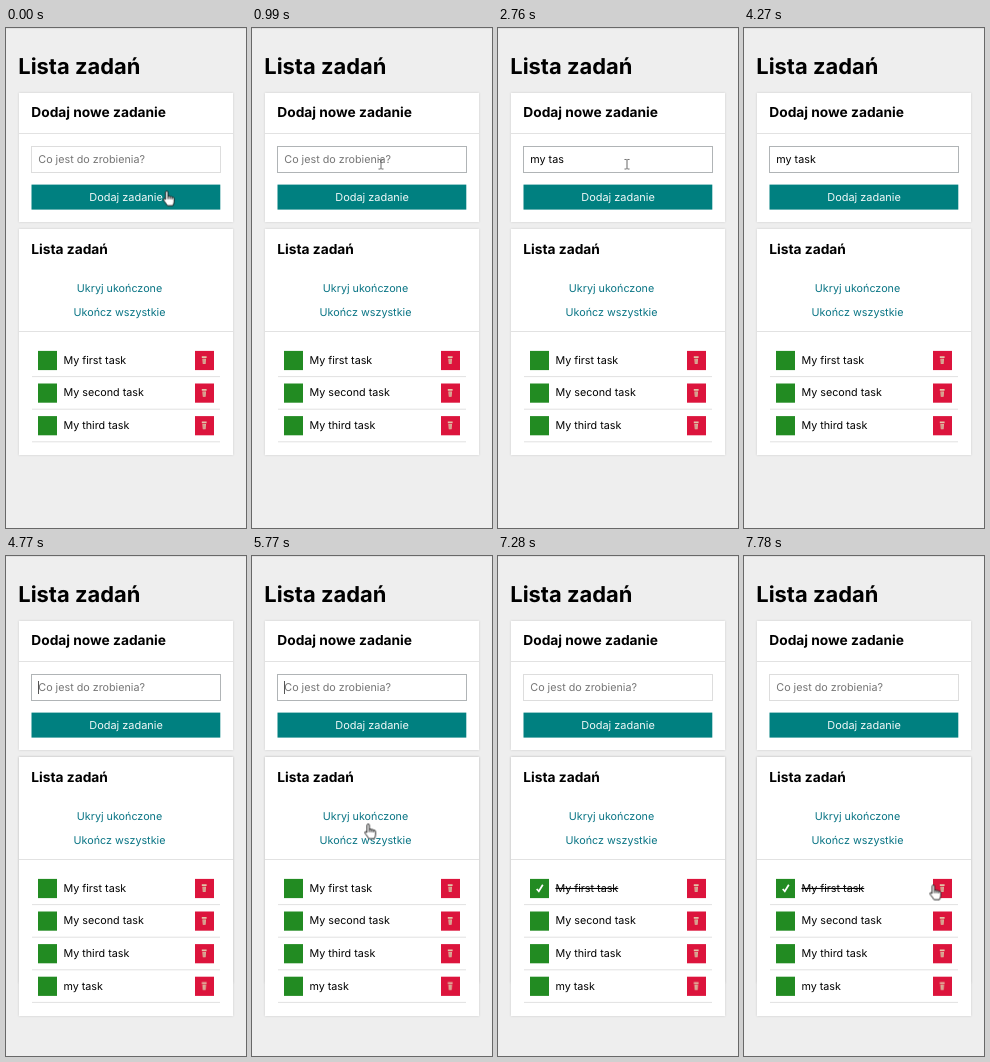
An HTML page for the animation above (8 s loop, 240 by 500 pixels).

```html
<!DOCTYPE html>
<html lang="pl">
<head>
<meta charset="utf-8">
<title>Lista zadań</title>
<style>
html, body { margin: 0; width: 100%; height: 100%; overflow: hidden; background: #eee; }
svg { display: block; width: 240px; height: 500px; }
text { font: 400 10.75px Inter, "Open Sans", sans-serif; fill: #000; text-rendering: geometricPrecision; white-space: pre; }
.h1 { font-size: 21.9px; font-weight: 700; }
.h2 { font-size: 13.75px; font-weight: 700; }
.hint { fill: #757575; }
.link { fill: #087484; text-anchor: middle; }
.button { fill: #f0f8f8; font-size: 10.95px; text-anchor: middle; }
.done { text-decoration: line-through; }
.card { fill: #fff; filter: drop-shadow(0 0 1.2px #ccc); }
.line { fill: #e2e2e2; }
.box { fill: #fff; stroke: #ddd; }
.focus { stroke: #b0b4b6; }
</style>
</head>
<body>
<svg id="stage" viewBox="0 0 240 500" xmlns="http://www.w3.org/2000/svg"></svg>
<script>
const LOOP = 8000;
const stage = document.getElementById('stage');

function add(tag, attrs, text) {
  const el = document.createElementNS('http://www.w3.org/2000/svg', tag);
  for (const key in attrs) el.setAttribute(key, attrs[key]);
  if (text) el.textContent = text;
  return stage.appendChild(el);
}
const rect = (x, y, width, height, attrs) => add('rect', { x, y, width, height, ...attrs });
const label = (x, y, text, cls = '') => add('text', { x, y, class: cls }, text);
const path = (x, y, d, attrs) => add('path', { d, transform: `translate(${x} ${y})`, ...attrs });

// Shows an element only during the given [from, to] spans, in ms.
function show(el, ...spans) {
  const frames = [];
  const key = (t, opacity) => frames.push({ offset: t / LOOP, opacity, easing: 'step-end' });
  if (spans[0][0] > 0) key(0, 0);
  for (const [from, to] of spans) {
    key(from, 1);
    if (to < LOOP) key(to, 0);
  }
  if (frames[frames.length - 1].offset < 1) key(LOOP, frames[frames.length - 1].opacity);
  el.animate(frames, { duration: LOOP, iterations: Infinity });
}

const ADDED = 4770, DONE = 7280;

// Page and form
rect(0, 0, 240, 1, { fill: '#e0e0e0' });
label(12.3, 45.8, 'Lista zadań', 'h1');
rect(13, 65, 214, 129, { class: 'card' });
label(25.3, 88.8, 'Dodaj nowe zadanie', 'h2');
rect(13, 105, 214, 1, { class: 'line' });
rect(25.5, 118.5, 189, 26, { class: 'box' });
show(rect(25.5, 118.5, 189, 26, { class: 'box focus' }), [990, DONE]);
rect(25.5, 156.6, 188.8, 25, { fill: '#008080' });
label(120, 172.8, 'Dodaj zadanie', 'button');

show(label(32.3, 135, 'Co jest do zrobienia?', 'hint'), [0, 1760], [ADDED, LOOP]);
[['my', 1760, 2760], ['my tas', 2760, 3260], ['my task', 3260, ADDED]]
  .forEach(([text, from, to]) => show(label(32.3, 135, text), [from, to]));

const caret = (x, ...spans) => show(rect(x, 125, 1, 13, { fill: '#555' }), ...spans);
caret(49, [1760, 2260]);
caret(73, [3780, 4270]);
caret(32, [ADDED, 5270], [5770, 6280], [6780, DONE]);

// Task list
rect(13, 201, 214, 226, { class: 'card' });
show(rect(13, 201, 214, 259, { class: 'card' }), [ADDED, LOOP]);
label(25.3, 226, 'Lista zadań', 'h2');
label(113.5, 263.5, 'Ukryj ukończone', 'link');
label(113.5, 288, 'Ukończ wszystkie', 'link');
rect(13, 303, 214, 1, { class: 'line' });

function row(index, text) {
  const y = 322.9 + index * 32.6;
  const lid = 'M.2.4H5V2.2H.2Z', bin = 'M.8 2.9H4.4L4 8.2H1.2Z';
  return [
    rect(32, y, 19, 19.2, { fill: '#228b22' }),
    label(57.4, y + 12.9, text),
    rect(189, y, 19, 19.2, { fill: '#dc143c' }),
    path(195.6, y + 5, lid + bin, { fill: '#e3c3a8' }),
    path(195.6, y + 5, 'M2 3.2V7.8M3.2 3.2V7.8', { stroke: '#c0716a', 'stroke-width': .5 }),
    rect(26, y + 25.2, 188, 1, { class: 'line' })
  ];
}
const first = row(0, 'My first task');
row(1, 'My second task');
row(2, 'My third task');
row(3, 'my task').forEach(el => show(el, [ADDED, LOOP]));

show(first[1], [0, DONE]);
show(label(57.4, 335.8, 'My first task', 'done'), [DONE, LOOP]);
show(path(38, 328, 'M.7 5L2.8 7.3L6.8.8', { fill: 'none', stroke: '#fff', 'stroke-width': 1.7 }), [DONE, LOOP]);

// Pointers
const HAND = 'M2.7 9V1.8Q2.7.5 3.9.5T5.1 1.8V5.7Q6.2 4.8 7.1 6.1Q8.4 5.4 9.1 6.7' +
  'Q11.2 6.2 11.3 8.2V11.2Q11.2 13.2 10 15.2H4.6Q3.6 13.5 1.1 10.3Q0 8.5 1.1 8.1Q2 8 2.7 9Z' +
  'M5.1 5.7V8.6M7.1 6.1V8.6M9.1 6.7V8.9';
const ARROW = 'M.5.5V12.5L3.3 9.9L5.2 14.5L7.2 13.6L5.3 9.2H9.2Z';
const BEAM = 'M0 .5H1.7L2.5 1L3.3.5H5M2.5 1V9.5M0 10H1.7L2.5 9.5L3.3 10H5';
const ink = { fill: '#fff', stroke: '#111', 'stroke-width': .9, 'stroke-linejoin': 'round' };

[
  [HAND, 156.8, 162.5, 0, 500],
  [ARROW, 118, 240, 5270, 5770],
  [HAND, 112.3, 267.5, 5770, 6280],
  [HAND, 105.3, 287.5, 6280, 6780],
  [HAND, 40.5, 324.5, 6780, DONE],
  [HAND, 185.4, 328.5, 7780, LOOP]
].forEach(([d, x, y, from, to]) => show(path(x, y, d, ink), [from, to]));
show(path(126.5, 131, BEAM, { fill: 'none', stroke: '#555', 'stroke-width': .9 }), [990, 4270]);
</script>
</body>
</html>
```
